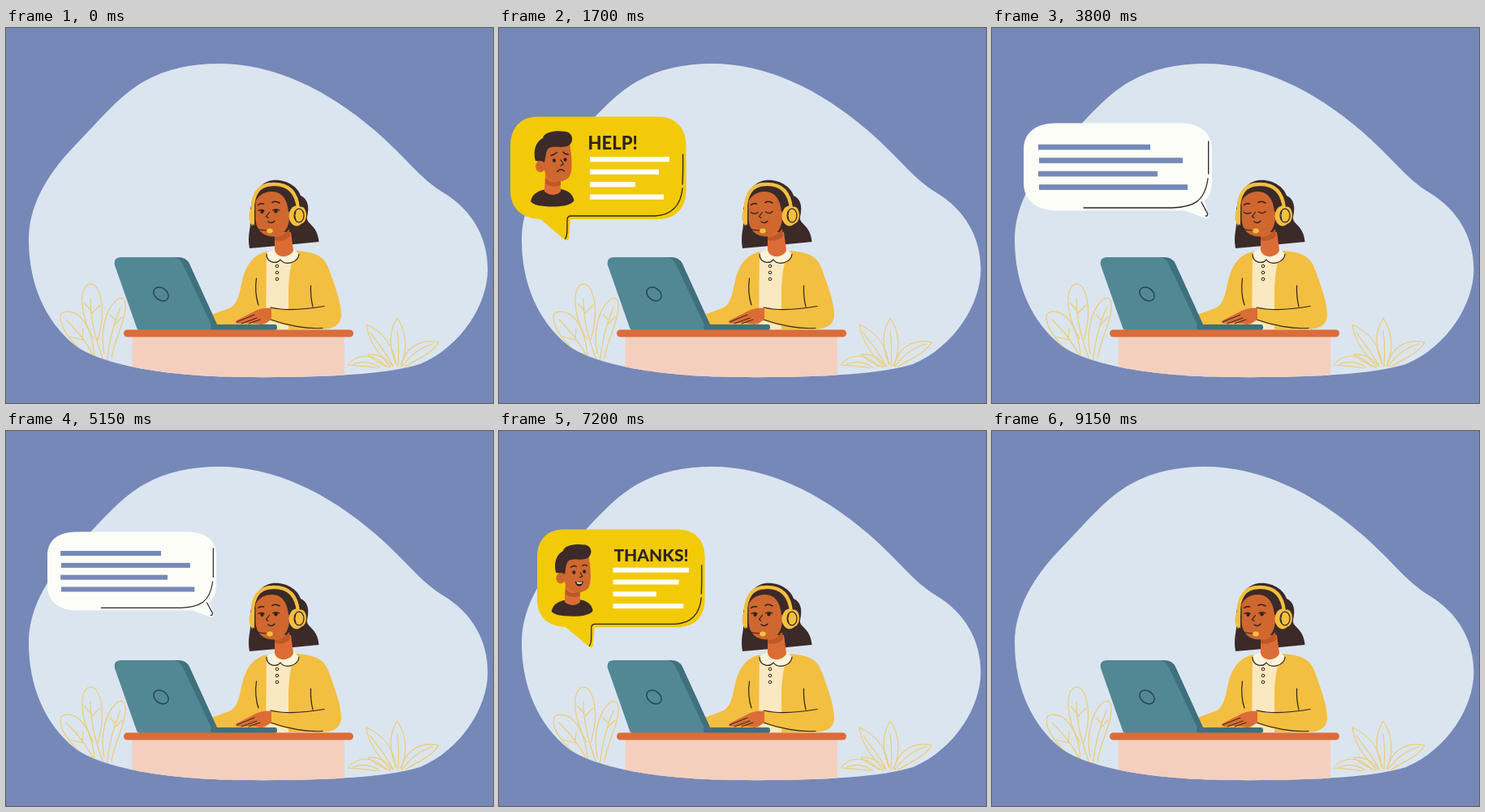
These frames come from a looping animation (600 px wide and 463 px high, 9.75 s). An HTML page with a canvas:

```html
<!DOCTYPE html>
<html lang="en">
<head>
<meta charset="utf-8">
<title>Support chat</title>
<style>
  html, body { margin: 0; width: 100%; height: 100%; overflow: hidden; background: #7588b8; }
  canvas { display: block; width: 600px; height: 463px; }
</style>
</head>
<body>
<canvas id="stage"></canvas>
<script>
const W = 600, H = 463, LOOP = 9750;
const canvas = document.getElementById('stage');
const dpr = window.devicePixelRatio || 1;
canvas.width = W * dpr;
canvas.height = H * dpr;
const ctx = canvas.getContext('2d');

const C = {
  bg: '#7588b8', blob: '#dbe5f0', gold: '#f3bf40', bubble: '#f2ca08', paper: '#fdfdf8',
  ink: '#2b2424', hair: '#3b2a28', skin: '#cf672f', neck: '#dc6c35', shade: '#bd5827',
  cream: '#fae8c0', teal: '#528894', tealDark: '#3f707d', desk: '#dc6c39', front: '#f5cfbe',
  plant: '#eecb72'
};

const BLOB = new Path2D('M262 44C330 44 396 76 455 127C494 161 510 186 540 204C574 225 593.5 258 593.5 298' +
  'C593.5 340 562 393 510 415C470 428 385 432 290 431C200 430 118 417 84 391C50 363 28 318 28 262' +
  'C28 222 48 183 85 145C118 111 140 83 170 66C198 50 230 44 262 44Z');

function fill(d, color) {
  ctx.fillStyle = color;
  ctx.fill(d instanceof Path2D ? d : new Path2D(d));
}
function line(d, width = 1.3, color = C.ink) {
  ctx.strokeStyle = color;
  ctx.lineWidth = width;
  ctx.stroke(new Path2D(d));
}
function oval(x, y, rx, ry, color, angle = 0, stroke = 0) {
  ctx.beginPath();
  ctx.ellipse(x, y, rx, ry, angle, 0, Math.PI * 2);
  if (stroke) {
    ctx.strokeStyle = color;
    ctx.lineWidth = stroke;
    ctx.stroke();
  } else {
    ctx.fillStyle = color;
    ctx.fill();
  }
}
function box(x, y, w, h, r, color) {
  ctx.beginPath();
  ctx.roundRect(x, y, w, h, r);
  ctx.fillStyle = color;
  ctx.fill();
}

function drawPlants() {
  const leaves = [
    // left plant
    'M108 384C95 363 90 333 97 321C101 314 108 315 112 321C121 336 120 362 113 385',
    'M104 334C104 356 110 385 121 412M97 340L105 349M116 342L106 352',
    'M101 403C88 396 66 373 67 356C68 348 80 349 88 354C100 363 107 382 109 405',
    'M74 360C88 374 102 391 110 410M78 381L94 385M95 371L94 384',
    'M121 402C116 380 121 349 136 336C143 330 148 335 147 346C146 366 134 382 130 408',
    'M141 345C134 361 127 383 124 414M128 354L135 361M143 357L134 366',
    // right plant
    'M474 418C456 400 446 383 444 366C463 375 478 391 480 415M449 376C458 390 470 402 477 418',
    'M481 415C471 393 472 374 482 358C494 376 495 398 486 417M482 374C484 388 484 400 483 418',
    'M487 417C491 396 509 383 533 388C525 402 509 407 492 418M526 390C511 394 498 404 488 418',
    'M473 419C460 414 449 407 446 403C458 402 470 408 476 417',
    'M457 420C446 417 434 417 421 416C432 402 452 400 468 418M428 415C440 410 450 412 460 419'
  ];
  leaves.forEach(d => line(d, 1.2, C.plant));
}

function drawLaptop() {
  fill('M146 283H212Q222 283 226 291L261 368V373H240Z', C.tealDark);
  fill('M134 293Q132 283 142 283H205Q214 283 218 292L256 373H165Q162 373 161 370Z', C.teal);
  oval(191, 328.5, 10, 7.4, '#27424c', 0.65, 1.4);
  box(252, 366, 82, 7, 3, C.tealDark);
}

function drawFace(closed) {
  fill('M307.5 213C308 203 318 199 330 200C343 201 349 212 349 228C350 246 343 257.5 329 257.5C315 257 307.5 248 307.5 234Z', C.skin);
  fill('M305 214C305 201 316 193 330 193C345 193 353 208 353 226L348 227C347 216 343 206 334 203C323 200 313 204 308 213Z', C.hair);
  line('M310.5 218.5Q313 216 317.5 217M328 215.5Q332 213 337 216', 1.5);
  if (closed) {
    line('M310.5 227.5Q314.5 231 319 227.7M328.5 227Q333 230.5 337 226.5', 1.4);
  } else {
    oval(315.5, 226.8, 2.1, 2.4, C.ink);
    oval(332.5, 226.2, 2.2, 2.4, C.ink);
    line('M311 225.5Q315 223.4 318 225.6M328.5 225Q333 222.7 336.8 225', 1.4);
  }
  line('M324.5 227.5L320.5 232.7L323 234.5', 1.2);
  line('M323 239Q327 242.5 331 238.2', 1.4);
}

function drawWoman(closed) {
  // hair behind the head
  fill('M328 188C346 186 360 197 363 207C372 211 374 221 371 233C369 242 384 243 385.5 264L334 269L300 272' +
    'C297 255 302 248 301 235C300 212 309 191 328 188Z', C.hair);
  // cardigan, blouse and neck
  fill('M322 276C304 280 297 292 292 308C287 327 287 343 272 347L253 354V368L300 372H385' +
    'C402 372 412 368 413 355C413 338 405 318 398 298C392 282 383 277 358 275Z', C.gold);
  fill('M321 277L358 276C350 288 348 310 348 330V372H320Z', C.cream);
  fill('M331 252H351L354 274C352 286 335 287 331 278Z', C.neck);
  fill('M331 258Q341 258 349 248L350 257Q342 265 331 262Z', C.shade);
  fill('M323 276L331 274C333 285 351 285 355 273L361 279C360 289 347 293 339 287C331 292 323 289 321 281Z', '#fdf2da');
  line('M321 279C321 290 333 292 338 286C344 294 360 290 361 279', 1.2);
  [294, 302, 310].forEach(y => oval(334, y, 1.8, 1.8, C.ink, 0, 1));
  line('M308.5 309Q306 327 311 342M375.5 318Q375 332 378 344', 1.2);

  drawFace(closed);

  // headset
  line('M304 226C303 205 312 193 328 193C348 192 358 203 360 223', 4.3, C.gold);
  fill('M301 224C298.5 231 299 239 303 244Q306 245 306 241V225Z', C.gold);
  oval(358, 232, 9.5, 12.5, C.gold);
  oval(363.5, 231, 6.5, 10.5, C.gold);
  oval(361, 231.5, 6, 8.3, C.ink, 0, 1.2);
  line('M357 226Q354.5 232 357 237', 1);
  line('M304 243Q308 250 321 250', 1.2);
  oval(325, 250.5, 3.8, 3, C.gold);

  // resting arm
  fill('M326 345C345 350 372 347 397 342L411 354Q408 371 385 372C360 372 343 367 326 361Z', C.gold);
  line('M326 345C347 350 372 347 392 343.5M326 360C345 367 370 372 390 370.5', 1.2);
}

function drawHand() {
  fill('M327 346C316 345 309 348 302 352L284 361Q282 364 286 365L301 364L315 366Q322 364 327 360Z', C.neck);
  line('M284 363L306 354M290 365L309 358M299 365L313 360', 1);
}

function drawDesk() {
  ctx.fillStyle = C.front;
  ctx.fillRect(155.5, 380, 261.5, 52);
}

function drawMan(happy) {
  fill('M39 214C41 204 50 200 60 199L75 199C86 200 91 206 92.5 213Q88 220.5 66 220.5Q43 220.5 39 214Z', C.hair);
  fill('M57 180H75L76 202Q67 210 56 202Z', C.neck);
  fill('M57 185Q67 195 76 187V194Q66 198 57 192Z', C.shade);
  fill('M55 142H87C90 160 91 176 87 183C82 191 66 192 59 183C55 178 54 165 55 142Z', C.skin);
  fill('M45 164C41 150 47 139 54 136C55 128 72 126 82 128C91 129 93 140 86 145C78 149 69 145 62 148C57 151 58 159 56 166Z', C.hair);
  oval(51, 171, 6, 7, C.skin);
  line('M48 169Q52 168 53 173', 1, C.shade);
  oval(68, 163.5, 2, 2.3, C.ink);
  oval(81.5, 162.5, 2, 2.3, C.ink);
  if (happy) {
    line('M64 157Q68 154 71 156M79 155Q82 153 85 155', 1.4);
    line('M76.5 164L79 169L75.5 170', 1.2);
    fill('M69.5 175Q75 177 80 174.5Q79 182.5 74 181.5Q70 180 69.5 175Z', C.ink);
    fill('M71.5 176Q75 177.5 78.5 175.8L78 178Q75 179 72 178Z', C.paper);
  } else {
    line('M64 157.5Q68 156.5 71.5 153.5M79 153Q81 156 85.5 156', 1.4);
    line('M76 163L79.5 168L76 170', 1.2);
    line('M71.5 177.5Q75.5 172.5 80.5 176.5', 1.4);
  }
}

function drawCallerBubble(text, happy) {
  fill('M48 109.5H196C218 109.5 230.5 124 230.5 145V200C230.5 222 218 236 196 236H88L86 260Q85 263.5 81 261.5' +
    'L51 236C27 235 14 222 14 200V146C14 124 26 109.5 48 109.5Z', C.bubble);
  line('M81.5 260Q84 258 84 246V237Q84 232 89 232H192C214 231 224 218 226 198M226 193Q227 176 226.5 156', 1.3);
  ctx.save();
  if (happy) ctx.translate(-6.5, 1.5);
  drawMan(happy);
  ctx.restore();
  ctx.fillStyle = C.ink;
  ctx.font = '800 22px Lato, sans-serif';
  ctx.fillText(text, happy ? 113 : 109.5, happy ? 151 : 149.5);
  ctx.fillStyle = C.paper;
  [98, 85, 56, 91].forEach((w, i) => ctx.fillRect(112, 159 + i * 15.5, w, 6.3));
}

function drawReplyBubble() {
  fill('M79 117.5H231C257 117.5 271 130 271 149V190Q271 205 262 214L267 232Q267 236 262 234.5L238 225.5H79' +
    'C53 225 39 211 39 192V150C39 130 53 117.5 79 117.5Z', C.paper);
  line('M113 222H222C249 221 262 214 266 186M266.7 180V140M258 215L265.5 229Q266 233 263 232', 1.3);
  ctx.fillStyle = C.bg;
  [[57, 138], [58, 177], [57, 147], [58, 183]].forEach(([x, w], i) => ctx.fillRect(x, 143.7 + i * 16.5, w, 6.7));
}

// Centre of scaling, entry and exit start times
const bubbles = [
  { x: 122, y: 186, from: 30, to: 1900, draw: () => drawCallerBubble('HELP!', false) },
  { x: 156, y: 186, from: 2700, to: 4806, draw: drawReplyBubble },
  { x: 150, y: 194.3, from: 5700, to: 8600, draw() {
    ctx.translate(47, 121.5);
    ctx.scale(0.954, 0.954);
    ctx.translate(-14, -109.5);
    drawCallerBubble('THANKS!', true);
  } }
];
const ENTER = 140, EXIT = 544;
const clamp = v => Math.min(1, Math.max(0, v));

function bubbleScale(b, t) {
  const enter = 1 - (1 - clamp((t - b.from) / ENTER)) ** 5;
  const exit = 1 - clamp((t - b.to) / EXIT) ** 5;
  return enter * exit;
}

const blinks = [1600, 3800, 4875, 6250, 6900, 7900];
const isBlinking = t => blinks.some(s => t >= s && t < s + 250);

function draw(t) {
  ctx.setTransform(dpr, 0, 0, dpr, 0, 0);
  ctx.lineCap = ctx.lineJoin = 'round';
  ctx.fillStyle = C.bg;
  ctx.fillRect(0, 0, W, H);
  fill(BLOB, C.blob);

  ctx.save();
  ctx.clip(BLOB);
  drawPlants();
  drawDesk();
  ctx.restore();

  drawWoman(isBlinking(t));
  drawLaptop();
  drawHand();
  box(145, 372.5, 283, 9, 4.5, C.desk);

  for (const b of bubbles) {
    const s = bubbleScale(b, t);
    if (s < 0.005) continue;
    ctx.save();
    ctx.translate(b.x, b.y);
    ctx.scale(s, s);
    ctx.translate(-b.x, -b.y);
    b.draw();
    ctx.restore();
  }
}

const start = performance.now();
function tick() {
  draw((performance.now() - start) % LOOP);
  requestAnimationFrame(tick);
}
tick();
</script>
</body>
</html>
```
